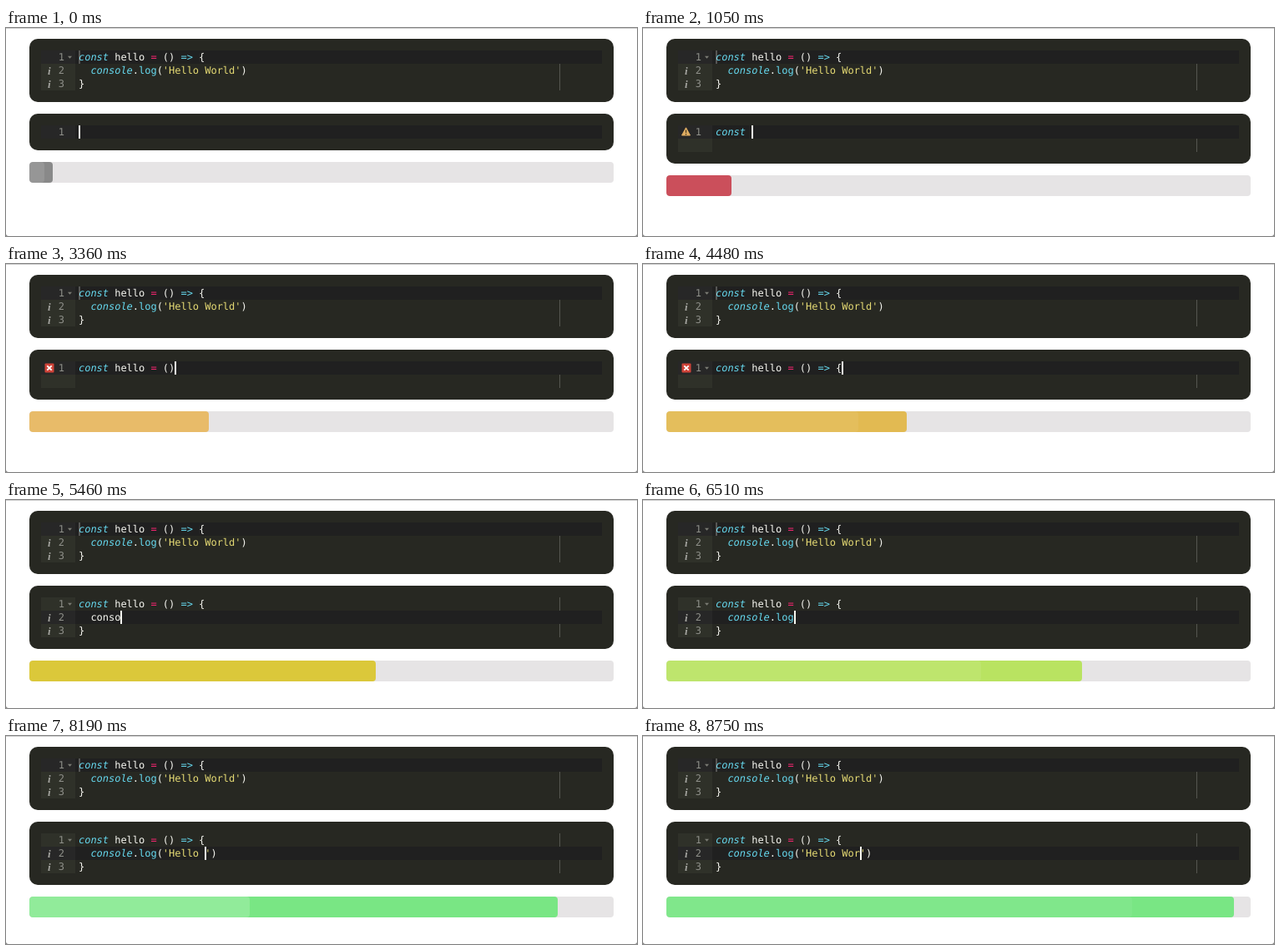
Recreate the animation shown at these times as an HTML page. Size 756 px wide and 250 px high, loop 8820 ms.

```html
<!DOCTYPE html>
<html lang="en">
<head>
<meta charset="utf-8">
<title>Typing progress</title>
<style>
html, body { margin: 0; width: 100%; height: 100%; overflow: hidden; background: #777; }
#stage {
  position: absolute; left: 0; top: 0; width: 756px; height: 250px;
  box-sizing: border-box; overflow: hidden; background: #fff;
  border-radius: 0 0 3px 3px; box-shadow: inset 0 1px #cfcfcf;
}
.editor {
  position: absolute; left: 28px; width: 672px; padding: 14px;
  border-radius: 10px; background: #272822; color: #f8f8f2;
  font: 12px/16px "DejaVu Sans Mono", "Noto Sans Mono", monospace;
  letter-spacing: -.024px; text-rendering: geometricPrecision; white-space: pre;
}
#sample { top: 13px; }
#typed { top: 103px; }
.row { position: relative; height: 16px; }
.row::after { content: ""; position: absolute; left: 621px; top: 0; width: 1px; height: 16px; background: #555651; }
.row.active { background: #202020; }
.row.active::after { display: none; }
.gutter { position: absolute; left: 0; top: 0; width: 28px; height: 16px; padding-right: 13px; background: #2f3129; color: #8f908a; text-align: right; }
.active .gutter { background: #272727; }
.gutter svg { position: absolute; left: 0; top: 0; }
.code { position: absolute; left: 45px; top: 0; }
.caret { position: absolute; top: 0; width: 2px; height: 16px; background: #f8f8f0; }
#sample .caret { opacity: .25; }
.key { color: #66d9ef; font-style: italic; }
.fn { color: #66d9ef; }
.op { color: #f92672; }
.str { color: #e6db74; }
#track { position: absolute; left: 28px; width: 700px; height: 25px; border-radius: 4px; background: #e6e4e5; overflow: hidden; }
#bar { position: relative; height: 25px; border-radius: 4px; overflow: hidden; }
#pulse { height: 25px; border-radius: 4px; background: #fff; }
</style>
</head>
<body>
<div id="stage">
  <div id="sample" class="editor"></div>
  <div id="typed" class="editor"></div>
  <div id="track"><div id="bar"><div id="pulse"></div></div></div>
</div>
<script>
const LOOP = 8820, PULSE = 2110, PULSE_START = 785, FADE = 100;
const GOAL = "const hello = () => {\n  console.log('Hello World')\n}";
const CHAR = 7.2;
const $ = id => document.getElementById(id);

// One entry per key press; Enter also brings the indent.
const KEYS = [..."const hello = () => {", "\n  ", ..."console.log('Hello Wor"];
const TIMES = [
  300, 430, 560, 690, 830, 1000, 1200, 1350, 1500, 1650, 1800, 2143,
  2400, 2600, 2900, 3150, 3400, 3650, 3900, 4150, 4441, 4740,
  4880, 5010, 5140, 5270, 5407, 5580, 5720, 6000, 6150, 6290, 6400,
  6680, 7020, 7300, 7540, 7690, 7830, 7960, 8095, 8330, 8470, 8600
];

// Brackets and quotes the editor closes by itself.
function closing(head) {
  const open = [];
  for (const c of head) {
    if (c === "(") open.unshift(")");
    else if (c === "{") open.unshift("}");
    else if (c === "\n") open[0] = "\n}";
    else if (c === "'" && open[0] !== "'") open.unshift("'");
    else if (c === open[0]) open.shift();
  }
  return open.join("");
}

const states = [{ time: -1e4, head: "", tail: "", count: 0 }];
KEYS.forEach((key, i) => {
  const head = states[i].head + key, tail = closing(head);
  states.push({ time: TIMES[i], head, tail: key === "{" ? "" : tail, count: head.length + tail.length });
});
const last = states[states.length - 1];
states.push({ ...last, time: 8722, count: last.count + 1 });

const svg = body => `<svg width="41" height="16">${body}</svg>`;
const ICONS = {
  info: svg('<text x="8" y="12.5" fill="#a6a6a1" font-family="Liberation Serif, serif" font-size="13" font-weight="bold" font-style="italic">i</text>'),
  warn: svg('<path d="M9.5 2.8 14.5 12H4.5Z" fill="#dfad62" stroke="#dfad62" stroke-linejoin="round"/><path d="M9.5 5.5V9M9.5 10V11.4" stroke="#4a3c22" stroke-width="1.3"/>'),
  error: svg('<rect x="4.5" y="2.5" width="11" height="11" rx="1" fill="#cf4339"/><path d="M7.3 5.3l5.4 5.4M12.7 5.3l-5.4 5.4" stroke="#fff" stroke-width="1.8"/>')
};
const FOLD = svg('<path d="M32 6.8h5l-2.5 3z" fill="#7b7c74"/>');

const TOKENS = /(\bconst\b|\bconsole\b|=>)|(\blog\b)|('[^']*'?)|(=)/g;
const paint = line => line.replace(/>/g, "\u0001").replace(/=\u0001/g, "=>").replace(TOKENS, (m, key, fn, str) =>
  `<span class="${key ? "key" : fn ? "fn" : str ? "str" : "op"}">${m.replace(">", "&gt;")}</span>`).replace(/\u0001/g, "&gt;");

function drawEditor(box, head, tail, height, icons) {
  const lines = (head + tail).split("\n"), before = head.split("\n");
  const active = before.length - 1, col = before[active].length;
  let html = "";
  for (let i = 0; i < height; i++) {
    const line = lines[i];
    const gutter = line === undefined ? "" : (i + 1) + (ICONS[icons[i]] || "") + (line.endsWith("{") ? FOLD : "");
    const caret = i === active ? `<div class="caret" style="left:${45 + col * CHAR}px"></div>` : "";
    html += `<div class="row${i === active ? " active" : ""}"><div class="gutter">${gutter}</div>` +
      `<div class="code">${paint(line || "")}</div>${caret}</div>`;
  }
  box.innerHTML = html;
}

function notes(t) {
  if (t < 800) return [];
  if (t < 2750) return ["warn"];
  if (t < 4740) return ["error"];
  return ["", "info", "info"];
}

// CSS "ease" curve
function ease(x) {
  if (x <= 0) return 0;
  if (x >= 1) return 1;
  let lo = 0, hi = 1, s;
  for (let i = 0; i < 24; i++) {
    s = (lo + hi) / 2;
    if (.75 * s * (1 - s) + s ** 3 < x) lo = s; else hi = s;
  }
  return .3 * (1 - s) ** 2 * s + 3 * (1 - s) * s * s + s ** 3;
}

const RED = "#cb4e5a", ORANGE = "#e8bb69", YELLOW = "#dfba47", OLIVE = "#dacb37", LIME = "#b9e361", GREEN = "#79e684";
const SCALE = [RED, RED, RED, ORANGE, YELLOW, YELLOW, OLIVE, LIME, LIME, GREEN, GREEN];
const share = n => n / GOAL.length;
const barWidth = n => Math.max(28, 700 * share(n));
const barColor = n => n ? SCALE[Math.floor(Math.round(share(n) * 100) / 10)] : "#898989";

let drawn = "";
function render(t) {
  let i = states.length - 1;
  while (states[i].time > t) i--;
  const now = states[i], prev = states[Math.max(0, i - 1)];

  const icons = notes(t), id = i + icons.join();
  if (id !== drawn) {
    drawn = id;
    const rows = now.head ? Math.max(2, (now.head + now.tail).split("\n").length) : 1;
    drawEditor($("typed"), now.head, now.tail, rows, icons);
    $("track").style.top = 145 + 16 * rows + "px";
  }

  const p = ease((t - now.time) / FADE), from = barWidth(prev.count);
  $("bar").style.width = from + (barWidth(now.count) - from) * p + "px";
  $("bar").style.background = `color-mix(in srgb, ${barColor(now.count)} ${p * 100}%, ${barColor(prev.count)})`;

  const q = ease((t + PULSE_START) % PULSE / PULSE);
  $("pulse").style.width = q * 100 + "%";
  $("pulse").style.opacity = .3 * (1 - q);
}

drawEditor($("sample"), "", GOAL, 3, ["", "info", "info"]);
const start = performance.now();
function tick() {
  render((performance.now() - start) % LOOP);
  requestAnimationFrame(tick);
}
tick();
</script>
</body>
</html>
```
